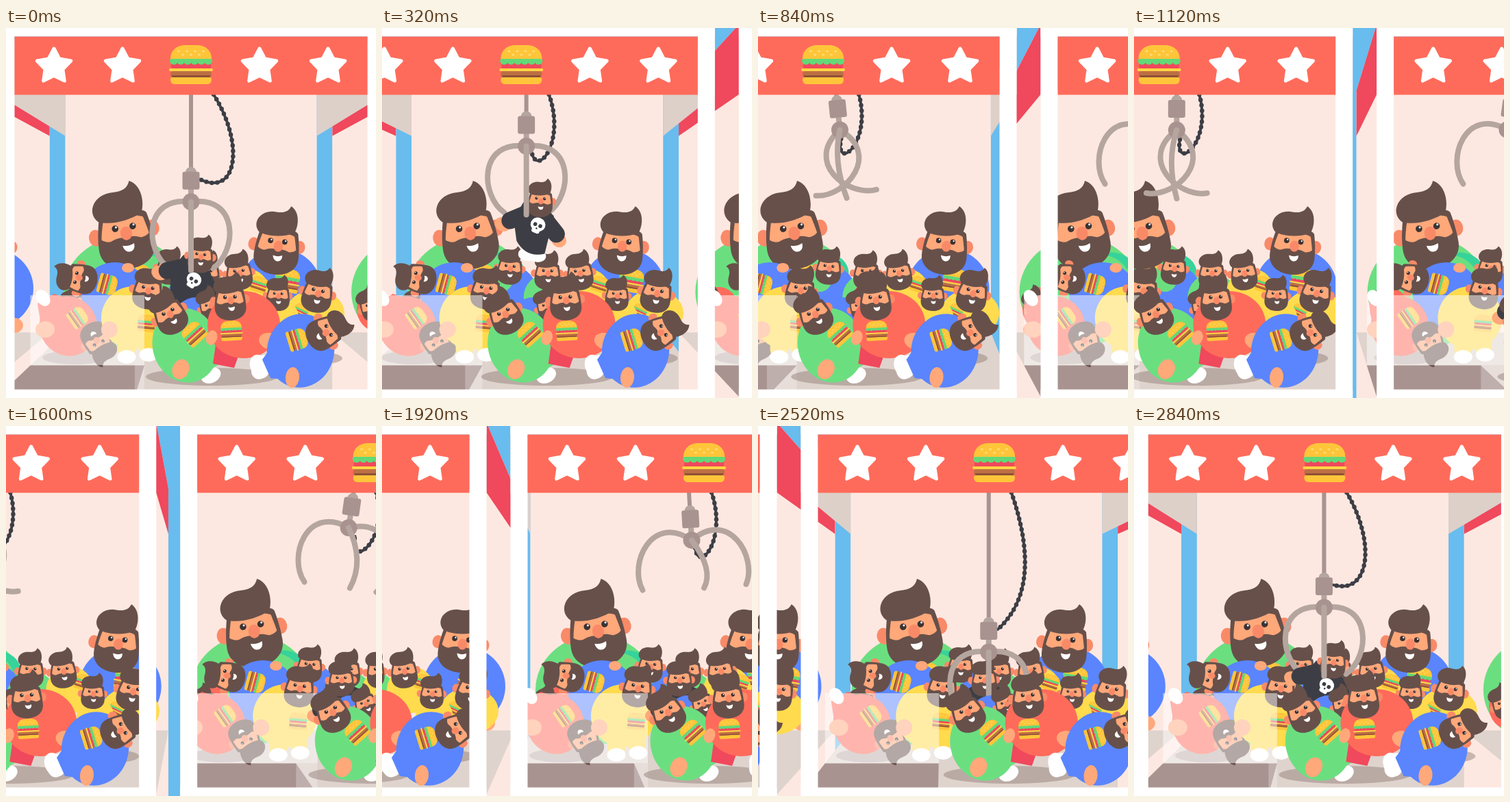
Write an HTML page with a canvas that moves like this. It is 540x540 px and loops after 2880 ms.

```html
<!DOCTYPE html>
<html lang="en">
<head>
<meta charset="utf-8">
<title>Claw machine</title>
<style>
html, body { margin: 0; width: 100%; height: 100%; overflow: hidden; background: #fff; }
canvas { display: block; width: 540px; height: 540px; }
</style>
</head>
<body>
<canvas id="stage" width="540" height="540"></canvas>
<script>
const ctx = document.getElementById('stage').getContext('2d');
const LOOP = 2880, STEP = 40, SPACING = 600, MID = 270;
const HALF = 282.5, FLOOR = 538, TOP = -5, BACK = 0.65, BOX = 0.83;
const RED = '#ff6b5b', GREEN = '#6bdf80', BLUE = '#5a85ff', YELLOW = '#ffdb4d', BLACK = '#3d3e45';
const SKIN = '#ffa87a', BLUSH = '#f98a68', HAIR = '#67504a', PINK = '#fde8e1', CRIMSON = '#f0485c';
const STEEL = '#a89390', ARM = '#b5a59f';
const rad = deg => deg * Math.PI / 180;
const clamp = (v, lo = 0, hi = 1) => Math.max(lo, Math.min(hi, v));
const px = (x, s) => MID + x * s;
const py = (y, s) => MID + (y - MID) * s;

// Eased interpolation through [time, value] pairs
function track(t, keys) {
  if (t <= keys[0][0]) return keys[0][1];
  for (let i = 1; i < keys.length; i++) {
    const [t0, v0] = keys[i - 1], [t1, v1] = keys[i];
    if (t < t1) return v0 + (v1 - v0) * (1 - Math.cos(Math.PI * (t - t0) / (t1 - t0))) / 2;
  }
  return keys[keys.length - 1][1];
}

function at(x, y, size, deg, draw) {
  ctx.save();
  ctx.translate(x, y);
  ctx.rotate(rad(deg));
  ctx.scale(size, size);
  draw();
  ctx.restore();
}
function oval(color, x, y, rx, ry = rx, deg = 0) {
  ctx.fillStyle = color;
  ctx.beginPath();
  ctx.ellipse(x, y, rx, ry, rad(deg), 0, 7);
  ctx.fill();
}
function rect(color, x, y, w, h, r = 0) {
  ctx.fillStyle = color;
  ctx.beginPath();
  ctx.roundRect(x, y, w, h, r);
  ctx.fill();
}
function poly(color, ...points) {
  ctx.fillStyle = color;
  ctx.beginPath();
  points.forEach(([x, y]) => ctx.lineTo(x, y));
  ctx.closePath();
  ctx.fill();
}
function fillPath(color, d) {
  ctx.fillStyle = color;
  ctx.fill(new Path2D(d));
}
function line(color, width, d) {
  ctx.strokeStyle = color;
  ctx.lineWidth = width;
  ctx.lineCap = 'round';
  ctx.stroke(new Path2D(d));
}

function burger(x, y, size, deg = 0) {
  at(x, y, size, deg, () => {
    rect('#ffc53a', -30, 16, 60, 10, [3, 3, 6, 6]);
    rect('#bd7043', -30, 7, 60, 9, 4);
    rect('#8d5038', -28, 13, 56, 3, 1);
    rect(CRIMSON, -29, -5, 58, 9, 3);
    rect('#ffd545', -32, 3, 64, 4, 2);
    fillPath('#ffc53a', 'M-30-9C-31-24-20-31-8-31H8C20-31 31-24 30-9Z');
    for (let i = 0; i < 7; i++) oval('#ffe07a', -18 + i * 6, -22 + (i % 2) * 5, 2, 1.3);
    rect('#63d977', -31, -11, 62, 6, 3);
    for (let i = 0; i < 6; i++) oval('#63d977', -25 + i * 10, -6, 5, 3.5);
  });
}

function star(x, y) {
  ctx.beginPath();
  for (let i = 0; i < 10; i++) {
    const r = i % 2 ? 13.5 : 26, a = rad(i * 36 - 90);
    ctx.lineTo(x + r * Math.cos(a), y + r * Math.sin(a));
  }
  ctx.closePath();
  ctx.fillStyle = ctx.strokeStyle = '#fff';
  ctx.lineWidth = 5;
  ctx.lineJoin = 'round';
  ctx.fill();
  ctx.stroke();
}

function head(x, y, size, deg) {
  at(x, y, size, deg, () => {
    oval(BLUSH, -43, 3, 10, 12);
    oval(BLUSH, 41, 1, 10, 12);
    fillPath(HAIR, 'M-34-24C-37-34 34-34 36-22C39-8 41 8 41 22C41 42 24 55 0 55S-41 42-41 22C-41 8-38-8-34-24Z');
    fillPath(SKIN, 'M-29-18C-20-24 20-24 30-17C32-8 34 0 35 7C28 14 16 12 0 12S-28 14-35 7C-34 0-32-8-29-18Z');
    oval(HAIR, -13, 17, 17, 8, -14);
    oval(HAIR, 13, 17, 17, 8, 14);
    fillPath(HAIR, 'M-36-20C-51-36-36-61-8-59C6-58 14-62 18-72C34-64 36-40 29-24C10-14-20-12-36-20Z');
    for (const side of [-13, 13]) {
      oval('#3c3334', side, -6, 4.8);
      oval('#fff', side + 1.5, -8, 1.5);
    }
    oval(BLUSH, 2, 3, 8.5, 10);
    fillPath('#fff', 'M-6 20Q3 23 11 19C13 33-4 35-6 20Z');
  });
}
const hand = (x, y, rx = 13, ry = 15, deg = 0) => oval(SKIN, x, y, rx, ry, deg);
const shoe = (x, y, deg = 0, size = 1) => oval('#fff', x, y, 15 * size, 11 * size, deg);

function backDolls(layer) {
  layer(0.7, () => {
    oval(GREEN, 172, 385, 88, 80);
    oval('#36d39b', 226, 352, 30, 23, 25);
    oval(GREEN, 208, 362, 38, 30, 20);
    burger(193, 362, 0.55, 5);
    head(173, 297, 1, -9);
    oval(BLUE, 400, 380, 60, 58);
    hand(432, 434, 13, 11);
    burger(410, 370, 0.6, 10);
    head(396, 316, 0.8, 6);
  });
  layer(0.72, () => {
    oval(RED, 108, 410, 28, 32);
    head(101, 405, 0.42, -25);
  });
  layer(0.77, () => {
    oval(BLUE, 245, 385, 32, 36);
    oval(GREEN, 225, 365, 18, 20);
    head(238, 350, 0.45, 6);
    oval(GREEN, 294, 393, 36, 35);
    head(293, 357, 0.46, 2);
    oval(YELLOW, 350, 385, 35, 34);
    burger(369, 375, 0.4, 18);
    head(340, 357, 0.47, -5);
  });
  layer(0.81, () => {
    oval('rgba(150,130,125,.45)', 100, 481, 47, 10);
    oval(BLUE, 159, 389, 49, 47);
    hand(178, 350, 9, 7);
    burger(147, 374, 0.48, 105);
    head(105, 365, 0.52, -78);
    poly(RED, [46, 402], [70, 388], [112, 402], [100, 440], [52, 440]);
    oval(RED, 91, 435, 42, 44, -25);
    shoe(54, 394, 55, 0.85);
    hand(57, 440, 14, 12);
    burger(104, 423, 0.45, 55);
    head(134, 457, 0.52, 155);
    oval(YELLOW, 451, 416, 43, 34);
    burger(430, 414, 0.35, 25);
    head(455, 386, 0.54, 12);
    oval(YELLOW, 400, 422, 27, 26);
    head(397, 390, 0.42, 3);
  });
  layer(BOX, () => {
    rect(YELLOW, 163, 440, 26, 40, 10);
    rect(YELLOW, 194, 440, 24, 38, 10);
    shoe(176, 480, 0, 0.9);
    shoe(208, 477, 0, 0.9);
    oval(YELLOW, 186, 423, 47, 46);
    hand(151, 440, 12, 12);
    burger(205, 432, 0.43, 5);
    head(207, 382, 0.52, 8);
  });
}

function frontDolls(layer) {
  layer(0.85, () => {
    oval(BLUE, 278, 425, 34, 32);
    head(298, 405, 0.4, -22);
  });
  layer(0.89, () => {
    oval('rgba(150,130,125,.5)', 300, 509, 96, 13);
    oval('rgba(150,130,125,.5)', 448, 482, 43, 10);
    shoe(299, 507, -25);
    oval(GREEN, 262, 463, 48, 55, -15);
    poly(GREEN, [255, 510], [284, 508], [312, 490], [300, 440]);
    hand(255, 498, 12, 15, 25);
    burger(275, 447, 0.52, -42);
    head(238, 417, 0.56, -27);
    poly(CRIMSON, [306, 462], [343, 468], [333, 496], [302, 490]);
    shoe(373, 495, -60, 1.25);
    oval(RED, 347, 433, 53, 49);
    hand(385, 457, 16, 12, 15);
    hand(300, 452, 8, 11, 20);
    burger(329, 443, 0.51, -3);
    head(327, 396, 0.56, -3);
  });
  layer(0.9, () => {
    shoe(370, 494, 65, 1.2);
    poly(BLUE, [374, 484], [402, 445], [425, 515], [386, 511]);
    oval(BLUE, 430, 471, 49, 54, 12);
    hand(418, 510, 10, 15, 5);
    burger(424, 455, 0.5, 73);
    head(468, 443, 0.56, 62);
  });
}

function backdrop(off) {
  const left = px(off - HALF, BACK), right = px(off + HALF, BACK), top = py(TOP, BACK);
  rect(PINK, left, top, right - left, 540 - top);
  for (const side of [-HALF, HALF]) {
    const x = off + side;
    if (x * side > 0) continue;
    const front = px(x, 1), rear = px(x, BACK);
    poly(PINK, [front, TOP], [rear, top], [rear, 540], [front, 540]);
    poly(CRIMSON, [front, TOP], [rear, top], [rear, py(97, BACK)], [front, 97]);
  }
  const floor = (color, x0, x1, s) => poly(color,
    [px(off + x0, s), py(FLOOR, s)], [px(off + x1, s), py(FLOOR, s)],
    [px(off + x1, 1), FLOOR], [px(off + x0, 1), FLOOR]);
  floor('#dfd3cd', -HALF, HALF, BACK);
  floor(STEEL, -HALF, -82, BOX);
}

function innerHeaders(off) {
  for (const side of [-HALF, HALF]) {
    const x = off + side;
    if (x * side <= 0) continue;
    poly('#ddd0c9', [px(x, 1), TOP], [px(x, BACK), py(TOP, BACK)], [px(x, BACK), py(97, BACK)], [px(x, 1), 97]);
  }
}

function glassBox(off) {
  const left = px(off - HALF, BOX), rear = px(off - 82, BOX), front = px(off - 82, 1);
  const right = Math.max(rear, front);
  rect('rgba(255,255,255,.5)', left, 390, right - left, 102);
  rect('rgba(255,255,255,.25)', Math.min(rear, front), 492, Math.abs(rear - front), 46);
}

const hubHeight = time => track(time, [[-1080, 149], [-480, 336], [560, 149]]);

function blackDoll(off, time) {
  if (time > 1000) return;
  const fall = Math.max(0, time - 520);
  const lifted = time < -480 ? 370 : Math.min(370, hubHeight(time) + 79);
  const y = lifted + 0.0015 * fall * fall;
  const x = track(time, [[-300, 268], [-60, 284], [250, 284], [600, 310]]);
  const turn = track(time, [[-300, 0], [-60, 32], [150, 32], [600, 0], [1000, -15]]);
  at(x + off * BOX, y, 1, turn, () => {
    shoe(12, 80, -20, 0.9);
    shoe(27, 77, -20, 0.8);
    hand(-38, 53, 12, 10);
    hand(47, 44, 11, 10);
    line(BLACK, 25, 'M-8 22L-30 44M14 22L40 37');
    fillPath(BLACK, 'M-22 12Q4 2 27 14L35 70Q12 86-10 68L-26 40Z');
    oval('#fff', 10, 34, 11, 10);
    rect('#fff', 4, 38, 12, 9, 3);
    oval(BLACK, 6, 35, 2.8);
    oval(BLACK, 14, 35, 2.8);
    oval(BLACK, 10, 40, 1.3);
    head(0, 0, 0.45, -turn * 0.8);
  });
}

function claw(off, time, drawDoll) {
  const hub = hubHeight(time), length = hub - 97;
  const x = MID + off * 0.89 + Math.min(0, (time + 1280) * 0.092);
  const tilt = track(time, [[-1280, 8], [-900, -4], [-680, -1], [-400, 0], [420, 0], [600, 12], [800, -6], [1120, 0]]);
  const open = track(time, [[-1280, 13], [-720, 40], [-640, 40], [-380, 0], [430, 0], [590, -44]]);
  const hang = draw => at(x, 97, 1, tilt, draw);

  // The cord hangs in a loop that straightens as the claw drops
  const drop = clamp((hub - 150) / 100);
  const bulge = 47 - Math.abs(hub - 250) * 0.27;
  const endX = x + 5 + 8 * drop - Math.sin(rad(tilt)) * (length - 31);
  const endY = hub + 12 - 45 * drop;
  const sag = Math.min(50, 128 - (hub - 150) * 0.98);
  const cord = `M${x + 33} 97C${x + 33 + bulge} 170 ${endX - 10 + 64 * drop} ${endY + sag} ${endX} ${endY}`;
  line(BLACK, 4, cord);
  ctx.setLineDash([0, 8]);
  line(BLACK, 6.5, cord);
  ctx.setLineDash([]);

  hang(() => {
    for (const side of [1, -1]) {
      ctx.save();
      ctx.translate(0, length);
      ctx.scale(side, 1);
      ctx.rotate(rad(open));
      line(ARM, 8, 'M0 0C-70-10-68 72-32 97');
      ctx.restore();
    }
  });
  drawDoll();
  hang(() => {
    rect(STEEL, -3, -5, 6, length - 30);
    oval(ARM, 0, length - 43, 8);
    rect(ARM, -4, length - 22, 8, 20);
    rect(STEEL, -12.5, length - 44, 25, 26, 3);
    oval(STEEL, 0, length, 12.5);
    const bend = clamp(open / 9, -0.5, 1);
    line(ARM, 8, `M0 ${length}Q${bend * 30} ${length + 45} ${14 * Math.max(0, bend)} ${length + 100 - Math.max(0, open)}`);
  });
}

function frame(off) {
  const x = MID + off;
  rect('#fff', x - HALF, 0, 2 * HALF, 12.5);
  rect('#fff', x - HALF, 527.5, 2 * HALF, 12.5);
  rect('#fff', x - HALF, 0, 25, 540);
  rect('#fff', x + HALF - 25, 0, 25, 540);
  rect(RED, x - HALF + 25, 12.5, 515, 85);
  for (const dx of [-200, -100, 100, 200]) star(x + dx, 56);
  burger(x, 56, 1);
}

function render(t) {
  const machines = [-1, 0, 1, 2].map(k => ({ off: SPACING * (k - t / LOOP), time: t - LOOP * k }));
  const each = draw => machines.forEach(({ off, time }) => draw(off, time));
  const layers = off => (depth, draw) => at(off * depth, 0, 1, 0, draw);
  rect('#68bcee', 0, 0, 540, 540);
  each(backdrop);
  each(innerHeaders);
  each(off => backDolls(layers(off)));
  each(glassBox);
  each((off, time) => claw(off, time, () => blackDoll(off, time)));
  each(off => frontDolls(layers(off)));
  each(frame);
}

const start = performance.now();
function tick() {
  const elapsed = (performance.now() - start) % LOOP;
  render(Math.floor(elapsed / STEP) * STEP);
  requestAnimationFrame(tick);
}
tick();
</script>
</body>
</html>
```
